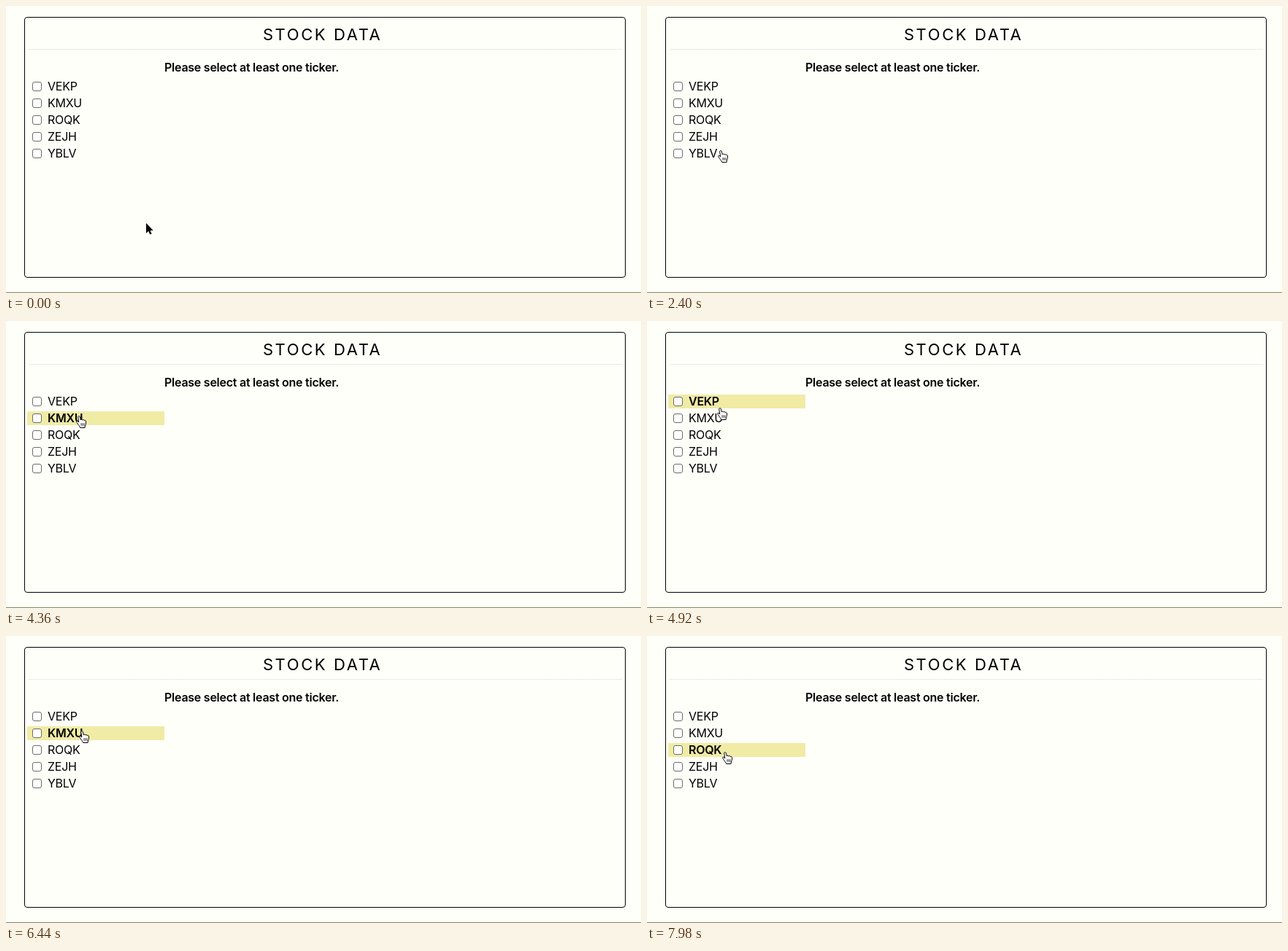
Write an HTML page that moves like this. It is 870 px wide and 394 px high and loops after 8 s.

```html
<!DOCTYPE html>
<html lang="en">
<head>
<title>Stock data</title>
<style>
  html, body { margin: 0; width: 100%; height: 100%; overflow: hidden; background: #fffffa; }
  svg { display: block; }
  text { font: 16px Inter, sans-serif; letter-spacing: -.25px; }
  .title { font-size: 22px; letter-spacing: 2.6px; }
  .notice, .hover text { font-weight: 600; }
  .band { fill: #f0eba5; visibility: hidden; }
  .hover .band { visibility: visible; }
  .box { fill: #fff; stroke: #6b6b6b; }
</style>
</head>
<body>
<svg width="870" height="394" viewBox="0 0 870 394">
  <rect x="25.5" y="15.5" width="823" height="357" rx="3.5" fill="none" stroke="#000"/>
  <text class="title" x="352" y="47">STOCK DATA</text>
  <path d="M31 59.5H845" stroke="#d3d3d3" stroke-dasharray="1 1"/>
  <text class="notice" x="217" y="90">Please select at least one ticker.</text>
  <path d="M0 393.5H870" stroke="#85855f"/>
  <g id="list"></g>
  <path id="arrow" d="M0 0V14L3.2 11L5.3 15.8L7.6 14.8L5.5 10.2H9.8Z"
        stroke="#fff" paint-order="stroke" stroke-width="1.6"/>
  <g id="hand" stroke="#000" stroke-linejoin="round">
    <path fill="#fff" d="M3.2 2C3 .3 5.6 .1 5.9 1.8L6.8 6C7 4.9 9.1 4.8 9.4 6.2C9.8 5.2 11.6 5.3 11.8 6.8
      C12.4 6 14 6.3 14 7.8C14.2 11 13.6 12.5 12.8 14L12.6 16.5H6.2C5.6 14.5 4 13 2.8 11
      C1.9 9.7 .8 8.6 1.1 7.8C1.6 6.8 3.3 7.4 4.3 9Z"/>
    <path d="M7.5 10.2V13.8M9.5 10.2V13.8M11.5 10.2V13.8" stroke-width=".8"/>
  </g>
</svg>
<script>
const LOOP = 8000;
const HAND_FROM = 1300;

// Each ticker with the spans (ms) during which its row is hovered.
const tickers = [
  ['VEKP', [[4860, 6040]]],
  ['KMXU', [[4180, 4720], [6200, 6740]]],
  ['ROQK', [[3520, 3940], [7080, LOOP]]],
  ['ZEJH', [[2560, 3220]]],
  ['YBLV', [[1360, 2400]]]
];

// Pointer path: time, x, y.
const path = [
  [0, 191.5, 298], [20, 191.5, 298], [820, 128, 242], [1240, 106.5, 216.5],
  [1520, 101, 203], [2220, 101, 203], [2960, 101, 182], [3060, 101, 181],
  [3360, 102, 162], [3640, 101, 154], [3780, 101, 154], [4360, 99.5, 130],
  [4600, 99, 129], [5060, 101, 114], [5600, 101, 114], [5900, 102, 115],
  [6320, 104, 128], [6420, 104, 129], [6980, 107.5, 149], [7160, 108, 156],
  [7260, 108, 156], [7420, 102, 166], [7580, 107, 159], [LOOP, 107, 159]
];

const byId = id => document.getElementById(id);
const arrow = byId('arrow'), hand = byId('hand'), list = byId('list');

list.innerHTML = tickers.map(([name], i) => `
  <g transform="translate(0 ${23 * i})">
    <rect class="band" x="29" y="101" width="188" height="19"/>
    <rect class="box" x="36.5" y="104.5" width="12" height="12" rx="2.5"/>
    <text x="57" y="116">${name}</text>
  </g>`).join('');

function pointerAt(t) {
  const i = path.findIndex(point => point[0] > t);
  const [t0, x0, y0] = path[i - 1], [t1, x1, y1] = path[i];
  const k = (t - t0) / (t1 - t0);
  return [x0 + (x1 - x0) * k, y0 + (y1 - y0) * k];
}

function draw(now) {
  const t = now % LOOP;
  const [x, y] = pointerAt(t).map(Math.round);
  const isHand = t >= HAND_FROM;
  arrow.style.display = isHand ? 'none' : '';
  hand.style.display = isHand ? '' : 'none';
  arrow.setAttribute('transform', `translate(${x} ${y})`);
  hand.setAttribute('transform', `translate(${x - 4.5} ${y})`);
  tickers.forEach(([, spans], i) => list.children[i].classList.toggle(
    'hover', spans.some(([from, to]) => t >= from && t < to)));
}

let start;
function tick(now) {
  start ??= now;
  draw(now - start);
  requestAnimationFrame(tick);
}
draw(0);
requestAnimationFrame(tick);
</script>
</body>
</html>
```
